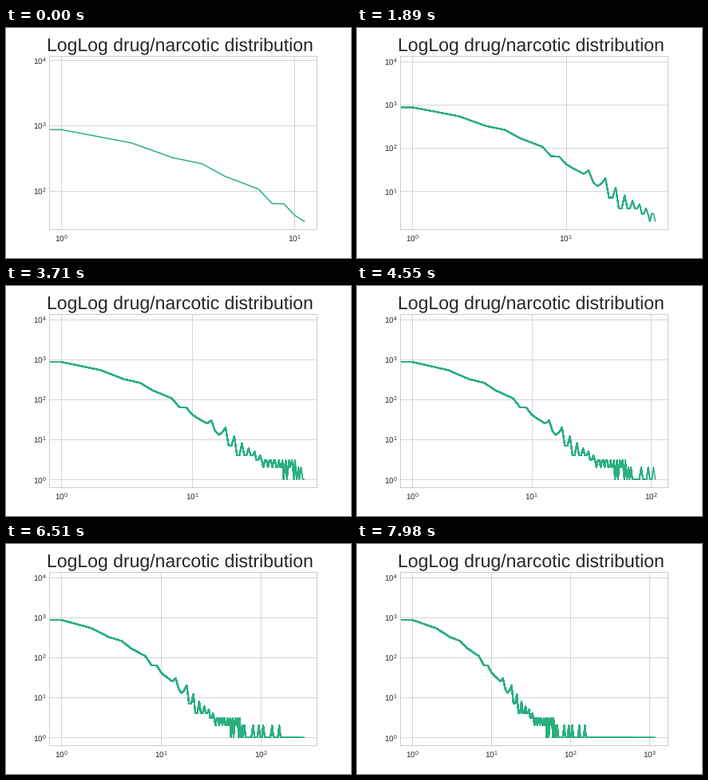
Recreate the animation shown at these times as a matplotlib script. Size 432 by 288 pixels, loop 8.75 s.

```python
import numpy as np
import matplotlib.pyplot as plt
from matplotlib.animation import FuncAnimation
from matplotlib.ticker import LogLocator, NullFormatter

W, H, DPI = 432, 288, 72
STEP_MS = 70
FRAMES = 125
POINTS = 126
FIRST = 12          # points shown at the start
MARGIN = 0.05
GREEN = "#2ab07f"
DARK = "0.15"
LIGHT = "0.8"

plt.rcParams.update({
    "font.family": "Liberation Sans",
    "font.size": 10,
    "text.color": DARK,
    "text.hinting": "none",
    "axes.edgecolor": LIGHT,
    "axes.linewidth": 1,
    "axes.axisbelow": True,
    "grid.color": LIGHT,
    "grid.linewidth": 0.8,
    "xtick.color": DARK,
    "ytick.color": DARK,
    "lines.solid_capstyle": "round",
})


def log_interp(x, knots, values):
    return np.exp(np.interp(x, knots, np.log(values)))


def degrees():
    """Every degree up to 52, then ever wider gaps."""
    n = np.arange(POINTS)
    sparse = log_interp(n, [52, 64, 76, 87, 104, 123, 124, 125],
                        [52, 72, 109, 157, 271, 660, 1100, 1179])
    return np.where(n <= 52, n, np.round(sparse)).astype(float)


def counts(degree):
    """Smooth head, rippling middle and a flat tail with single bumps."""
    x = np.maximum(degree, 1)
    head = log_interp(np.log(x),
                      np.log([1, 2, 3, 4, 5, 7, 8, 9, 10, 11, 13, 14, 15, 16]),
                      [865, 540, 321, 260, 168, 106, 64, 63, 42, 34,
                       25, 30, 16, 13])

    trend = 1.85 + 10.4 * (18 / x) ** 4.3
    ripple = np.exp(0.55 * np.cos(2 * np.pi * (x - 14.7) / 3.1))
    floor = 1 + sum(x < edge for edge in (31, 34, 49))
    middle = np.maximum(trend * ripple, floor)

    count = np.select([x <= 16, x < 70], [head, middle], 1).round()
    count[[68, 72, 75, 81, 86]] = 2
    count[0] = 8900
    return count


def padded(low, high):
    """Limits with the margin added in log space."""
    a, b = np.log10([low, high])
    pad = MARGIN * (b - a)
    return 10 ** (a - pad), 10 ** (b + pad)


degree = degrees()
count = counts(degree)
last_step = POINTS - FIRST

fig = plt.figure(figsize=(W / DPI, H / DPI), dpi=DPI, facecolor="white")
ax = fig.add_axes([0.125, 0.125, 0.775, 0.755])
ax.set_xscale("log")
ax.set_yscale("log")
ax.grid(True, which="major")
ax.tick_params(which="both", length=0)
ax.tick_params(axis="x", pad=5)
ax.tick_params(axis="y", pad=3.5)
for axis in (ax.xaxis, ax.yaxis):
    axis.set_major_locator(LogLocator(numticks=12))
    axis.set_minor_formatter(NullFormatter())

fig.text(218 / W, 259 / H, "LogLog drug/narcotic distribution",
         fontsize=23, ha="center", va="baseline")

# Each step adds a longer line on top of the earlier ones.
lines = [ax.plot(degree[:FIRST + k], count[:FIRST + k], color=GREEN,
                 lw=1.5, visible=False)[0]
         for k in range(last_step + 1)]


def update(frame):
    step = min(frame, last_step)
    for k, line in enumerate(lines):
        line.set_visible(k <= step)
    n = FIRST + step
    ax.set_xlim(*padded(1, degree[n - 1]))
    ax.set_ylim(*padded(count[:n].min(), count[0]))
    return lines


anim = FuncAnimation(fig, update, frames=FRAMES, interval=STEP_MS,
                     init_func=lambda: update(0), repeat=True,
                     repeat_delay=0, blit=False)
plt.show()
```
